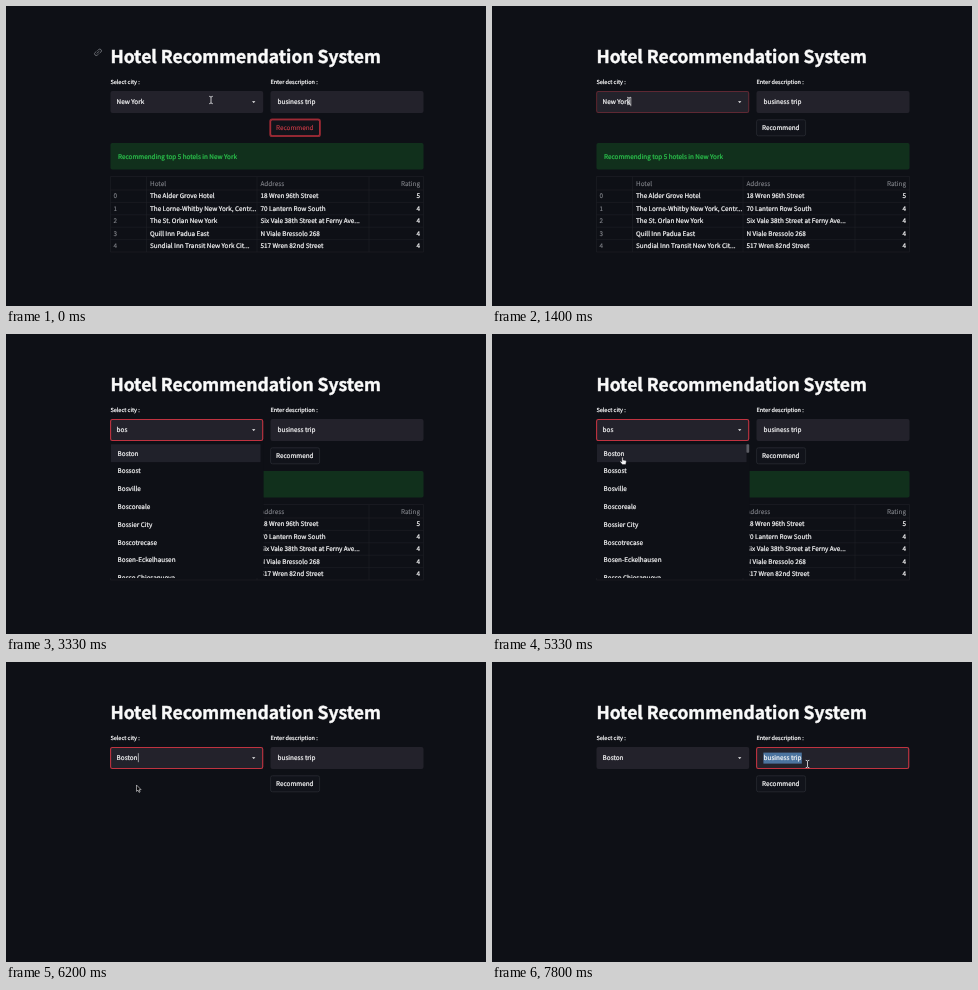
An HTML page for the animation above (8 s loop, 480 px wide and 300 px high).

```html
<!DOCTYPE html>
<html lang="en">
<head>
<meta charset="utf-8">
<title>Hotel Recommendation System</title>
<style>
  html, body { margin: 0; width: 100%; height: 100%; overflow: hidden; background: #0e1016; }
  svg { display: block; width: 100%; height: 100%; }
  text {
    font: 6.37px "Noto Sans CJK JP", "Noto Sans CJK SC", "Noto Sans CJK", "Noto Sans", sans-serif;
    text-rendering: geometricPrecision;
    white-space: pre;
    fill: #f6f6f7;
    stroke: #f6f6f7;
    stroke-width: .23px;
  }
  .title { font-size: 17.5px; font-weight: 700; fill: #fafafa; stroke: #fafafa; stroke-width: .45px; }
  .label { font-size: 5.57px; }
  .dim { fill: #85878d; stroke: #85878d; stroke-width: .1px; }
  .good { fill: #2bc24c; stroke: #2bc24c; }
  .alarm { fill: #d03c48; stroke: #d03c48; stroke-width: .1px; }
  .end { text-anchor: end; }
  .field { fill: #23222b; }
  .focus { fill: none; stroke: #c03340; stroke-width: 1.1; }
  .grid { fill: none; stroke: #1f2128; stroke-width: .6; }
</style>
</head>
<body>
<svg id="stage" viewBox="0 0 480 300"></svg>
<script>
const LOOP = 8000;
const ROW = 12.4, ITEM = 17.8;

const hotels = [
  ["The Alder Grove Hotel", "18 Wren 96th Street", 5],
  ["The Lorne-Whitby New York, Centr...", "70 Lantern Row South", 4],
  ["The St. Orlan New York", "Six Vale 38th Street at Ferny Ave...", 4],
  ["Quill Inn Padua East", "N Viale Bressolo 268", 4],
  ["Sundial Inn Transit New York Cit...", "517 Wren 82nd Street", 4]
];

const cities = {
  "New York": ["A Guarda", "Aalborg", "Aalden", "Aalen", "Aalst", "Aanekoski", "Aarau", "Aarhus"],
  b: ["Baabe", "Baar", "Babenhausen", "Bacharach", "Bacoli", "Bad Abbach", "Bad Aibling", "Bad Bramstedt"],
  bo: ["Bo", "Boadilla del Monte", "Bobbio", "Bobingen", "Boca Raton", "Bochnia", "Bochum", "Bodrum"],
  bos: ["Boston", "Bossost", "Bosville", "Boscoreale", "Bossier City", "Boscotrecase",
        "Bosen-Eckelhausen", "Bosco Chiesanuova"]
};

// [time, x, y] of the pointer's hot spot
const pointerPath = [
  [0, 205, 94], [70, 205, 94], [530, 130, 84], [730, 130, 84], [1000, 137, 95],
  [4200, 137, 95], [4330, 140, 204], [4530, 130.5, 123], [6200, 130.5, 123],
  [6670, 395, 100], [7670, 395, 100], [7800, 315.5, 102]
];

const typed = [[0, "New York"], [2600, "b"], [2730, "bo"], [2930, "bos"], [5870, "Boston"]];
const caretOn = [[1400, 2000], [2530, 3330], [3870, 4400], [4870, 5330], [5870, 6400]];

const text = (x, y, content, cls = "", id = "") =>
  `<text x="${x}" y="${y}" class="${cls}" id="${id}">${content}</text>`;
const rect = (x, y, w, h, attrs = "") =>
  `<rect x="${x}" y="${y}" width="${w}" height="${h}" ${attrs}/>`;

function tableMarkup() {
  const bottom = 184 + ROW * hotels.length;
  let lines = `M104.5 170.5H417.5V${bottom}H104.5ZM140.5 170.5V${bottom}M251 170.5V${bottom}M363 170.5V${bottom}`;
  let cells = text(144, 179.9, "Hotel", "dim") + text(254.5, 179.9, "Address", "dim") +
              text(414, 179.9, "Rating", "dim end");
  hotels.forEach(([name, address, rating], i) => {
    const y = 192.3 + i * ROW;
    lines += `M104.5 ${184 + i * ROW}H417.5`;
    cells += text(107.5, y, i, "dim") + text(144, y, name) + text(254.5, y, address) +
             text(414, y, rating, "end");
  });
  return `<path class="grid" d="${lines}"/>${cells}`;
}

document.getElementById("stage").innerHTML = `
  <defs><clipPath id="listClip">${rect(104, 107.8, 154, 136.2)}</clipPath></defs>
  <g id="link" transform="translate(92 46.3) rotate(-40)" fill="none" stroke="#6a6d73" stroke-width=".9">
    <path d="M-.6 -1.7H-2.3A1.7 1.7 0 0 0 -2.3 1.7H-.6M.6 -1.7H2.3A1.7 1.7 0 0 1 2.3 1.7H.6M-1.8 0H1.8"/>
  </g>
  ${text(104.4, 56.8, "Hotel Recommendation System", "title")}
  ${text(104.4, 78.2, "Select city :", "label")}
  ${text(264.4, 78.2, "Enter description :", "label")}
  ${rect(104.5, 85, 152.7, 22, 'rx="2" class="field"')}
  ${rect(264.5, 85, 153, 22, 'rx="2" class="field"')}
  ${rect(104.6, 85.5, 152.1, 21, 'rx="1.8" class="focus" id="cityFocus"')}
  ${rect(264.6, 85.5, 152.1, 21, 'rx="1.8" class="focus" id="tripFocus"')}
  <path d="M246 95.2H249.4L247.7 97.1Z" fill="#f4f4f5"/>
  ${text(110.6, 98.3, "", "", "city")}
  ${rect(0, 91.2, .6, 9, 'id="caret" fill="#f4f4f5"')}
  ${rect(0, 90.6, 0, 11, 'id="selection" fill="#4c749f"')}
  ${text(271.6, 98.3, "business trip")}
  ${rect(264.6, 113.8, 49, 16, 'rx="1.8" fill="#11131a" stroke="#2c2e35" stroke-width=".7"')}
  ${text(270, 124.2, "Recommend")}
  <g id="buttonFocus">
    ${rect(264.2, 113.4, 49.8, 16.8, 'rx="2" fill="#11131a" stroke="#8f2731" stroke-width="1.8"')}
    ${rect(264.7, 113.9, 48.8, 15.8, 'rx="1.8" fill="none" stroke="#c03440" stroke-width=".5"')}
    ${text(270, 124.2, "Recommend", "alarm")}
  </g>
  <g id="results">
    ${rect(104.5, 137, 313, 26.5, 'rx="1.8" fill="#11301c"')}
    ${text(112, 152.7, "Recommending top 5 hotels in New York", "good")}
    ${tableMarkup()}
  </g>
  <g id="popover" clip-path="url(#listClip)">
    ${rect(104, 107.8, 153.6, 136.2, 'fill="#0e1016"')}
    ${rect(105, 110.3, 149.5, ITEM, 'id="hover" fill="#20212a"')}
    ${rect(254.4, 110.3, 2.8, 8.4, 'id="scrollbar" rx=".8" fill="#5b5d64"')}
    ${cities.bos.map((_, i) => text(111.6, 121.5 + i * ITEM, "", "item")).join("")}
  </g>
  <g id="pointer">
    <path id="beam" d="M-1.8 -3.7Q0 -3.7 0 -2.4Q0 -3.7 1.8 -3.7M0 -2.4V2.4M-1.8 3.7Q0 3.7 0 2.4Q0 3.7 1.8 3.7"
      fill="none" stroke="#d8d8dc" stroke-width=".9"/>
    <path id="arrow" d="M0 0V6.4L1.5 5.1L2.5 7.4L3.6 6.9L2.6 4.7H4.6Z" fill="#08080a" stroke="#e8e8ea" stroke-width=".6"/>
    <path id="hand" d="M-.6 .6Q0 -.2 .6 .6V3L3.2 3.6Q4 3.9 3.8 4.8L3.2 7.6H-.2L-2.4 4.8Q-2.3 3.8 -1.4 4.2L-.6 4.9Z"
      fill="#f2f2f4" stroke="#15161b" stroke-width=".4"/>
  </g>`;

const el = id => document.getElementById(id);
const items = [...document.querySelectorAll(".item")];
const show = (id, visible) => el(id).setAttribute("visibility", visible ? "inherit" : "hidden");
const fade = (id, opacity) => el(id).setAttribute("opacity", opacity);
const ramp = (t, from, to) => Math.min(1, Math.max(0, (t - from) / (to - from)));
const ease = p => p * p * (3 - 2 * p);
const within = (t, from, to) => t >= from && t < to;

function pointerAt(t) {
  const next = pointerPath.findIndex(key => key[0] > t);
  if (next < 0) return pointerPath.at(-1).slice(1);
  const [t0, x0, y0] = pointerPath[next - 1], [t1, x1, y1] = pointerPath[next];
  const p = ease(ramp(t, t0, t1));
  return [x0 + (x1 - x0) * p, y0 + (y1 - y0) * p];
}

function drawPointer(t, x, y, open) {
  const overField = within(y, 83, 107) && (within(x, 104, 257) || within(x, 264, 418));
  const shape = overField ? "beam" : open ? "hand" : "arrow";
  for (const id of ["beam", "arrow", "hand"]) show(id, id === shape);
  show("pointer", !within(t, 2530, 4200));
  el("pointer").setAttribute("transform", `translate(${x} ${y})`);
}

function draw(t) {
  const [x, y] = pointerAt(t);
  const city = typed.findLast(([start]) => t >= start)[1];
  const open = within(t, 1530, 5870);

  fade("link", 1 - ramp(t, 70, 400));
  fade("buttonFocus", 1 - ramp(t, 800, 1000));
  fade("cityFocus", ramp(t, 1200, 1530) ** 2 * (1 - ramp(t, 6870, 7070)));
  fade("tripFocus", ramp(t, 6870, 7130));
  show("results", t < 6130);

  el("city").textContent = city;
  el("caret").setAttribute("x", 111 + el("city").getComputedTextLength());
  show("caret", caretOn.some(([from, to]) => within(t, from, to)));

  // double click picks the last word, triple click the whole line
  const start = t < 7270 ? 298.8 : 271.4;
  el("selection").setAttribute("x", start);
  el("selection").setAttribute("width", 309.8 - start);
  show("selection", t >= 7070);

  show("popover", open);
  if (open) {
    items.forEach((item, i) => item.textContent = cities[city][i]);
    const row = t < 4200 ? 0 : Math.max(0, Math.floor((y - 110.3) / ITEM));
    el("hover").setAttribute("y", 110.3 + row * ITEM);
    show("hover", t >= 3000);
    show("scrollbar", t >= 4200);
  }
  drawPointer(t, x, y, open);
}

const begin = performance.now();
function tick() {
  draw((performance.now() - begin) % LOOP);
  requestAnimationFrame(tick);
}
tick();
</script>
</body>
</html>
```
